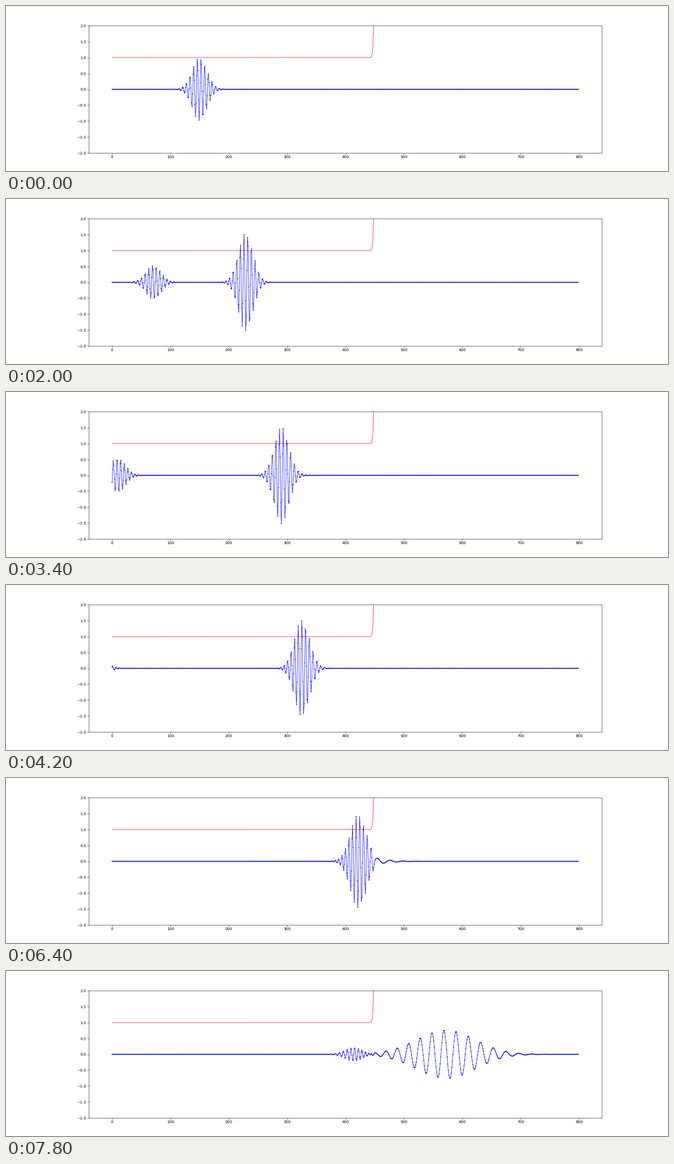
Write a matplotlib script that moves like this. It is 1280 px wide and 320 px high and loops after 8 s.

```python
import numpy as np
import matplotlib.pyplot as plt
from matplotlib.animation import FuncAnimation

FRAMES, INTERVAL = 40, 200
TIME_PER_FRAME, TIME_STEP = 10.0, 0.01

# The grid runs past the visible 0..799 so that waves leave without an echo.
grid = np.arange(-150, 850)
visible = (grid >= 0) & (grid < 800)
stiffness = 5.5 + 4.5 * np.tanh((grid - 450) / 2)

# Wave packet that starts with a velocity of -2 times its slope.
CENTER, WIDTH = 150, 12.5
offset = grid - CENTER
envelope = np.exp(-offset**2 / (2 * WIDTH**2))
start = envelope * np.sin(grid)
velocity = -2 * envelope * (np.cos(grid) - offset / WIDTH**2 * np.sin(grid))

# Solve u_tt = (K u_x)_x through its normal modes.
difference = np.diff(np.eye(grid.size), axis=0)
operator = difference.T @ (stiffness[:-1, None] * difference)
eigenvalues, modes = np.linalg.eigh(operator)
omega = np.sqrt(np.clip(eigenvalues, 0, None))
start_modes = modes.T @ start
velocity_modes = modes.T @ velocity
visible_modes = modes[visible]


def wave(t):
    swing = t * np.sinc(omega * t / np.pi)
    return visible_modes @ (start_modes * np.cos(omega * t) + velocity_modes * swing)


def frame_time(n):
    return 0.0 if n == 0 else TIME_PER_FRAME * (n - 1) + TIME_STEP


plt.rcParams["font.family"] = "DejaVu Sans"
plt.rcParams["text.hinting"] = "none"
fig, ax = plt.subplots(figsize=(24, 6), dpi=1280 / 24)
x = grid[visible]
ax.plot(x, stiffness[visible], "r-", linewidth=1)
line, = ax.plot(x, wave(0), "b-", linewidth=1)
# One colour per dot keeps the dots at subpixel positions.
dots = ax.scatter(x, wave(0), s=2.5**2, c=["b"] * x.size, linewidths=0, zorder=3)
ax.set_ylim(-2, 2)


def update(n):
    u = wave(frame_time(n))
    line.set_ydata(u)
    dots.set_offsets(np.column_stack([x, u]))
    return line, dots


animation = FuncAnimation(fig, update, frames=FRAMES, interval=INTERVAL,
                          repeat=True, repeat_delay=0)
plt.show()
```
